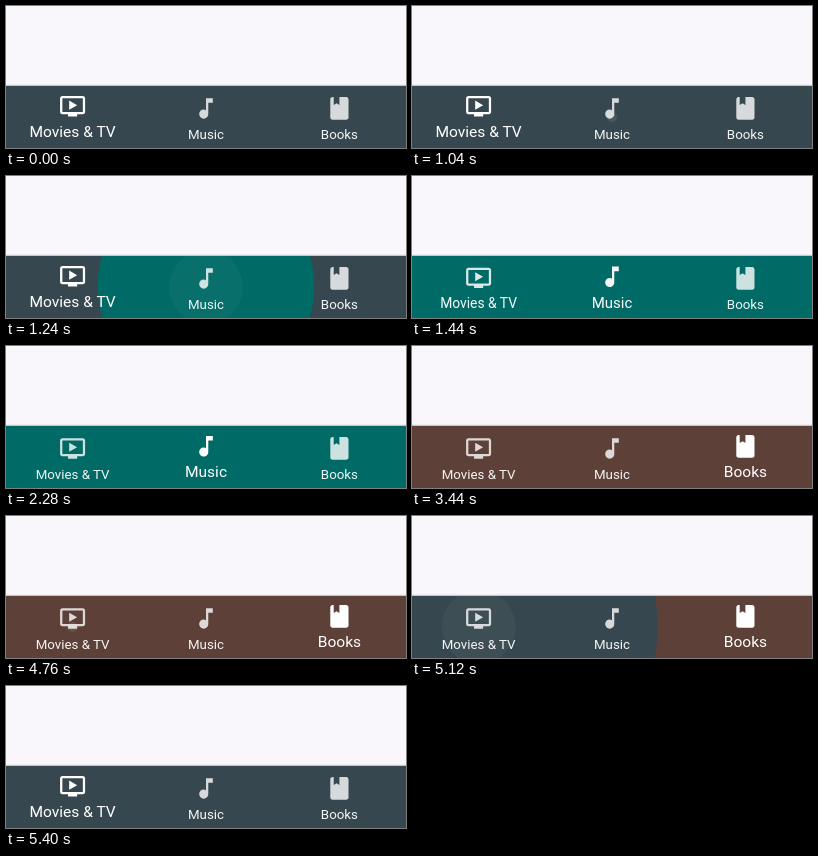
Animation, 400 px wide and 142 px high, one loop 5440 ms. Source, as an HTML page:

```html
<!DOCTYPE html>
<html lang="en">
<head>
<meta charset="utf-8">
<title>Bottom navigation</title>
<style>
  html, body { margin: 0; width: 100%; height: 100%; overflow: hidden; background: #f9f7fb; }
  svg { display: block; width: 100%; height: 100%; }
  text { font-family: Roboto, sans-serif; text-anchor: middle; fill: #fff; }
</style>
</head>
<body>
<svg viewBox="0 0 400 142">
  <defs>
    <clipPath id="bar"><rect y="80" width="400" height="62"/></clipPath>
  </defs>
  <rect width="400" height="142" fill="#f9f7fb"/>
  <rect y="78" width="400" height="1" fill="#000" opacity=".04"/>
  <rect y="79" width="400" height="1" fill="#000" opacity=".2"/>
  <g clip-path="url(#bar)">
    <rect id="base" y="80" width="400" height="62"/>
    <circle id="reveal" cy="110"/>
    <circle id="touch" cy="111" fill="#fff"/>
  </g>
  <g id="tabs" fill="#fff"></g>
</svg>
<script>
const LOOP = 5440, STEP = 40;
const SMALL = 13.3, LARGE = 15.55, ICON_SCALE = 1.1375;

const tabs = [
  { label: 'Movies & TV', x: 66.6, color: '#37474f',
    icon: 'M21 3H3c-1.11 0-2 .89-2 2v12c0 1.1.89 2 2 2h5v2h8v-2h5c1.1 0 1.99-.9 1.99-2L23 5c0-1.11-.9-2-2-2zm0 14H3V5h18v12zm-5-6l-7 4V7z' },
  { label: 'Music', x: 200, color: '#006a66',
    icon: 'M12 3v10.55c-.59-.34-1.27-.55-2-.55-2.21 0-4 1.79-4 4s1.79 4 4 4 4-1.79 4-4V7h4V3z' },
  { label: 'Books', x: 333.4, color: '#5d4037',
    icon: 'M18 22c1.1 0 2-.9 2-2V4c0-1.1-.9-2-2-2h-6v7L9.5 7.5 7 9V2H6c-1.1 0-2 .9-2 2v16c0 1.1.9 2 2 2h12z' }
];

// press: finger down; start: the new colour begins to spread
const taps = [
  { from: 0, to: 1, press: 1040, start: 1040 },
  { from: 1, to: 2, press: 2920, start: 2920 },
  { from: 2, to: 0, press: 4760, start: 4920 }
];

const byId = id => document.getElementById(id);
const set = (el, attrs) => { for (const k in attrs) el.setAttribute(k, attrs[k]); };
const progress = (t, a, b) => Math.min(1, Math.max(0, (t - a) / (b - a)));
const ease = p => (1 - Math.cos(Math.PI * p)) / 2;
const mix = (a, b, p) => a + (b - a) * p;

function add(name) {
  const el = document.createElementNS('http://www.w3.org/2000/svg', name);
  return byId('tabs').appendChild(el);
}

for (const tab of tabs) {
  tab.path = add('path');
  tab.text = add('text');
  tab.path.setAttribute('d', tab.icon);
  tab.text.textContent = tab.label;
  tab.text.setAttribute('x', tab.x);
}

function drawTab(tab, active) {
  set(tab.path, {
    transform: `translate(${tab.x} ${mix(102.4, 100.3, active)}) scale(${ICON_SCALE}) translate(-12 -12)`,
    opacity: mix(0.8, 1, active)
  });
  set(tab.text, {
    y: mix(132.6, 131.4, active),
    'font-size': mix(SMALL, LARGE, active),
    opacity: mix(0.95, 1, active)
  });
}

function draw(time) {
  const tap = taps.filter(s => time >= s.press).pop() || { from: 0, to: 0, start: -LOOP };
  const age = time - tap.start;
  const target = tabs[tap.to];
  const spread = ease(progress(age, 12, 372));
  const reach = Math.hypot(Math.max(target.x, 400 - target.x), 32);
  const shift = ease(progress(age, 240, 480));

  set(byId('base'), { fill: tabs[tap.from].color });
  set(byId('reveal'), { cx: target.x, r: reach * spread, fill: target.color });
  set(byId('touch'), {
    cx: target.x,
    r: mix(5, 37, progress(age, 0, 110)),
    opacity: 0.09 * (1 - progress(age, 0, 320))
  });
  tabs.forEach((tab, i) =>
    drawTab(tab, i === tap.to ? (tap.from === tap.to ? 1 : shift) : i === tap.from ? 1 - shift : 0));
}

const begin = performance.now();
function tick() {
  const time = (performance.now() - begin) % LOOP;
  draw(Math.floor(time / STEP) * STEP);
  requestAnimationFrame(tick);
}
tick();
</script>
</body>
</html>
```
